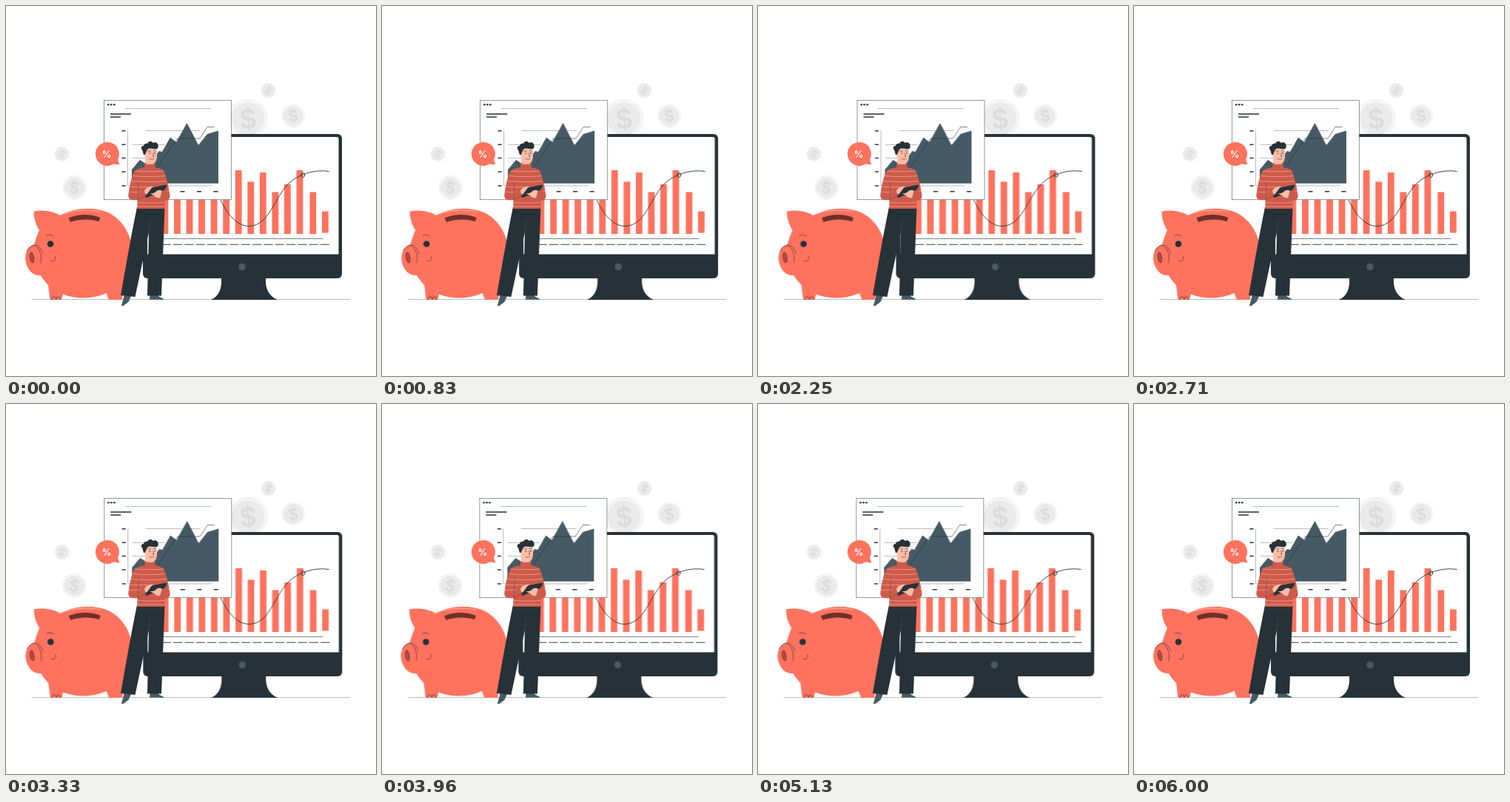
An HTML page for the animation above (6.04 s loop, 500 by 500 pixels).

```html
<!DOCTYPE html>
<html lang="en">
<head>
<meta charset="utf-8">
<title>Savings</title>
<style>
html, body { margin: 0; width: 100%; height: 100%; overflow: hidden; background: #fff; }
svg { display: block; width: 100vw; height: 100vh; }
.dark { fill: #263238; }
.slate { fill: #455a64; }
.coral { fill: #ff725e; }
.knit { fill: #cc5b4b; }
.skin { fill: #ffbca7; }
.line { fill: none; stroke: #263238; stroke-width: .6; stroke-linecap: round; stroke-linejoin: round; }
.tick { fill: none; stroke: #263238; stroke-width: 1.5; }
.faint { opacity: .55; }
text { font-family: Inter, "Open Sans", Arial, sans-serif; font-weight: 700; text-anchor: middle; }
</style>
</head>
<body>
<svg viewBox="0 0 500 500">
  <g id="coins"></g>
  <path class="line faint" d="M35 396.5H465"/>

  <g id="shaker">
    <g id="monitor">
      <path class="dark" d="M291 367C292 382 288 392 277 397H367C355 392 350 382 351 367Z"/>
      <rect class="dark" x="185" y="173" width="269" height="195" rx="6"/>
      <path fill="#fff" d="M191 177H447Q449.500 177 449.500 180V335.500H191Z"/>
      <circle class="slate" cx="319" cy="352.500" r="4.800"/>
      <g id="bars" class="coral"></g>
      <path class="line" d="M211 314.500H428"/>
      <path class="line" style="stroke-width:.9" stroke-dasharray="11.500 3.800" d="M211 322.300H438"/>
      <path class="line" style="stroke-width:.9" d="M290 262C300 284 314 297.500 328 297.500C359 297.500 363 250 390 233.500C404 225 420 221 436 223.500"/>
      <ellipse class="line" style="stroke-width:.9" cx="401.200" cy="228.500" rx="2.500" ry="3"/>
    </g>

    <g id="panel">
      <rect x="132.500" y="127.500" width="172" height="134.300" fill="#fff" stroke="#263238" stroke-width=".5"/>
      <g class="dark">
        <circle cx="138.200" cy="133.300" r="1.300"/>
        <circle cx="142.200" cy="133.300" r="1.300"/>
        <circle cx="146.200" cy="133.300" r="1.300"/>
      </g>
      <path class="line faint" d="M161 138.500H276M164.500 169V243H278M189 168.500H262M171 187.500H214M171 205.500H200"/>
      <path class="tick" d="M141 146H169M141 150H155"/>
      <path class="tick" d="M156.500 168.800h5M156.500 187.200h5M156.500 205.600h5M156.500 224h5M156.500 243h5M235.500 250.800h6M258 250.800h6M280.500 250.800h6"/>
      <path class="slate" d="M170 239.700V221L181 208L192 215L207 196L211 197L222 177.500L230 184L244.500 158L260 188L272 173L287 168.500V239.700Z"/>
      <path class="line" d="M205 217L231.500 179H262L272 163.500H281"/>
    </g>

    <g id="pig">
      <path class="coral" d="M73 283C99 269 134 271 151 288C168 303 175 330 168 352C162 372 158 380 157 397H139L135.500 388C115 396.500 95 396.500 77 389.500L75 397H59.500L57 377C53 373 49 368 47 364C36 365 28 356 26.200 343C25.500 333 30 324 38 322.500C40 316 42 309 45 303C40 295 37.500 287 37.500 277.500C51 275 65 278 73 283Z"/>
      <path fill="none" stroke="#ffc2b8" stroke-width=".7" d="M70 284C87 276 108 274 128 278"/>
      <path fill="#6e302a" d="M84.500 286.300C98 281 114 280.500 127.500 286L125.500 291.300C113 287.300 100 287.500 87 292Z"/>
      <ellipse cx="35" cy="340" rx="2.700" ry="7.200" transform="rotate(-9 35 340)" fill="#b4483c" stroke="#263238" stroke-width=".5"/>
      <path class="line" d="M38 323C45 326 49 336 47 347M40.500 323C45 324 48 329 50 334M28.500 331C30 327 34 324 38 323M61 344.500C66 346 68 342 66.500 338.500M54.500 310.500C57 308.700 61 308.700 64 311M62 396.500C62 391.500 68 391.500 68 396.500C68 391.500 73.500 391.500 73.500 396.500"/>
      <circle class="dark" cx="60" cy="321.500" r="4.300"/>
    </g>
  </g>

  <g id="man">
    <path class="slate" d="M159.500 391L169 392L165.500 400L158 405.500L156 405C157 400 159 396 159.500 391Z"/>
    <path class="slate" d="M194.500 390H206L206.500 392.500C209 394 212 395 214 396.800H194Z"/>
    <path class="dark" d="M177 272H214.500L210 391.500H191L193 306L174.500 393L155 391C162 352 169 310 177 272Z"/>
    <path fill="none" stroke="#455a64" stroke-width=".5" d="M193.200 306L195 290"/>
    <path class="knit" d="M188 218C181 219 175 220 172 226C168 237 166 248 165.300 257C166 262 171 263 177.500 262V274H214.500V263C219 263 222 260 221.500 256C220 244 217 233 214 224C211 220 207 219 201 218Z"/>
    <g fill="none" stroke="#ff9d8c" stroke-width=".8">
      <path d="M174 223C186 224 200 224 213 223M171 229.500C186 231 202 231 215.500 229.500M169 236.500C186 238 204 238 217.500 236.500M167 244C174 245 184 245 191 244M178 265.500C190 266.500 202 266.500 214.500 265.500M178 271H214.500M166 251C171 252 177 252 181 251M216 250.500L220.500 250"/>
    </g>
    <path class="line faint" d="M178 262L179.500 238M177.500 262C183 260 187 257 191 254"/>
    <path class="skin" d="M188 205H201V214C198 217 191 217 188 214Z"/>
    <path class="knit" d="M187.500 212.500C192 214.500 197 214.500 201 212.500L202 219C197 221.500 191 221.500 187 219Z"/>
    <path class="skin" d="M187 193H203.500C204.500 200 204.500 206 202.500 210C200 213.500 195 213.500 191 210C189 208 188.500 204 188 202C185.500 203 184 198 186.500 196.500Z"/>
    <path class="dark" d="M187 201.500C184.500 198 185 196 184 194.500C181.500 192 183 189 186 189C186.500 186 189.500 185 191 186C192 182.500 197 182 198.500 185C201.500 183 206 185.500 205.500 189C207 191.500 204 194 201 193C198 193.500 194 191.500 191.500 193.500C189.500 195.500 189.500 199 187 201.500Z"/>
    <path class="line" d="M192.500 196.500L195.500 195.700M199.500 195.500L202 196M198.500 199L200 203L198 203.500M194.500 206.500C196.500 207.700 198.500 207.300 200 206.200"/>
    <circle class="dark" cx="194.500" cy="199" r=".8"/>
    <circle class="dark" cx="201" cy="198.700" r=".8"/>
    <path class="skin" d="M187 249.500C190 245 195 242.500 199 244.500L201 247L193 254L188 254Z"/>
    <path class="dark" d="M197 245.500L215.500 241.800Q218 241.600 217 244L214 249.500L190.500 258.800Q187.500 259.500 189 256.500Z"/>
    <path class="skin" d="M194 253C198 254 202 252 204 249.500C207 248 212 249 212.500 252L211 258C206 261 201 258 200 256Z"/>
    <path class="knit" d="M211 250.500L216 247L221 254C222 260 218 263 213 262L208.500 259.500Z"/>
    <path class="line faint" d="M211 250.500L208.500 259.500"/>
  </g>

  <g id="bubble">
    <path class="coral" d="M137 184A16 16 0 1 0 145.500 213.500L153.500 214.500L151 207.800A16 16 0 0 0 137 184Z"/>
    <text x="136.200" y="204.800" font-size="12.500" fill="#fff">%</text>
  </g>
</svg>

<script>
const NS = "http://www.w3.org/2000/svg";

function add(parent, tag, attrs, content = "") {
  const el = document.createElementNS(NS, tag);
  for (const key in attrs) el.setAttribute(key, attrs[key]);
  el.textContent = content;
  parent.append(el);
}

// x, y, radius, tilt of the sign
const coins = [
  [354.500, 114, 10.500, 30],
  [388, 148.500, 16, -8],
  [327, 152.500, 27, -6],
  [75.500, 200, 10.500, 30],
  [92.500, 245.500, 16.500, 10]
];
const coinLayer = document.getElementById("coins");
for (const [cx, cy, r, tilt] of coins) {
  add(coinLayer, "circle", { cx, cy, r, fill: "#f4f4f4" });
  add(coinLayer, "circle", { cx, cy, r: r * .78, fill: "#ebebeb", stroke: "#e0e0e0", "stroke-width": .7 });
  add(coinLayer, "text", {
    x: cx, y: cy + r * .48, "font-size": r * 1.32, fill: "#dcdcdc",
    transform: `rotate(${tilt} ${cx} ${cy})`
  }, "$");
}

const tops = [250, 250, 250, 250, 250, 250, 222, 237.500, 225, 251.500, 241, 222, 251.500, 277.500];
const bars = document.getElementById("bars");
tops.forEach((y, i) => {
  const x = 210.500 + i * 16.550 + (i > 11 ? 1.300 : 0);
  const bottom = i === tops.length - 1 ? 306.500 : 308;
  add(bars, "rect", { x, y, width: 8.800, height: bottom - y });
});

// One sideways step every 600 ms, then a short rest at the end
const LOOP = 6040;
const shifts = [0, -1, 2, -3, 3, -3, 3, -3, 2, -1, 0];
const steps = shifts.map((x, i) => ({ offset: i * 600 / LOOP, transform: `translateX(${x}px)` }));
steps.push({ offset: 1, transform: "translateX(0px)" });
document.getElementById("shaker").animate(steps, { duration: LOOP, iterations: Infinity });
</script>
</body>
</html>
```
